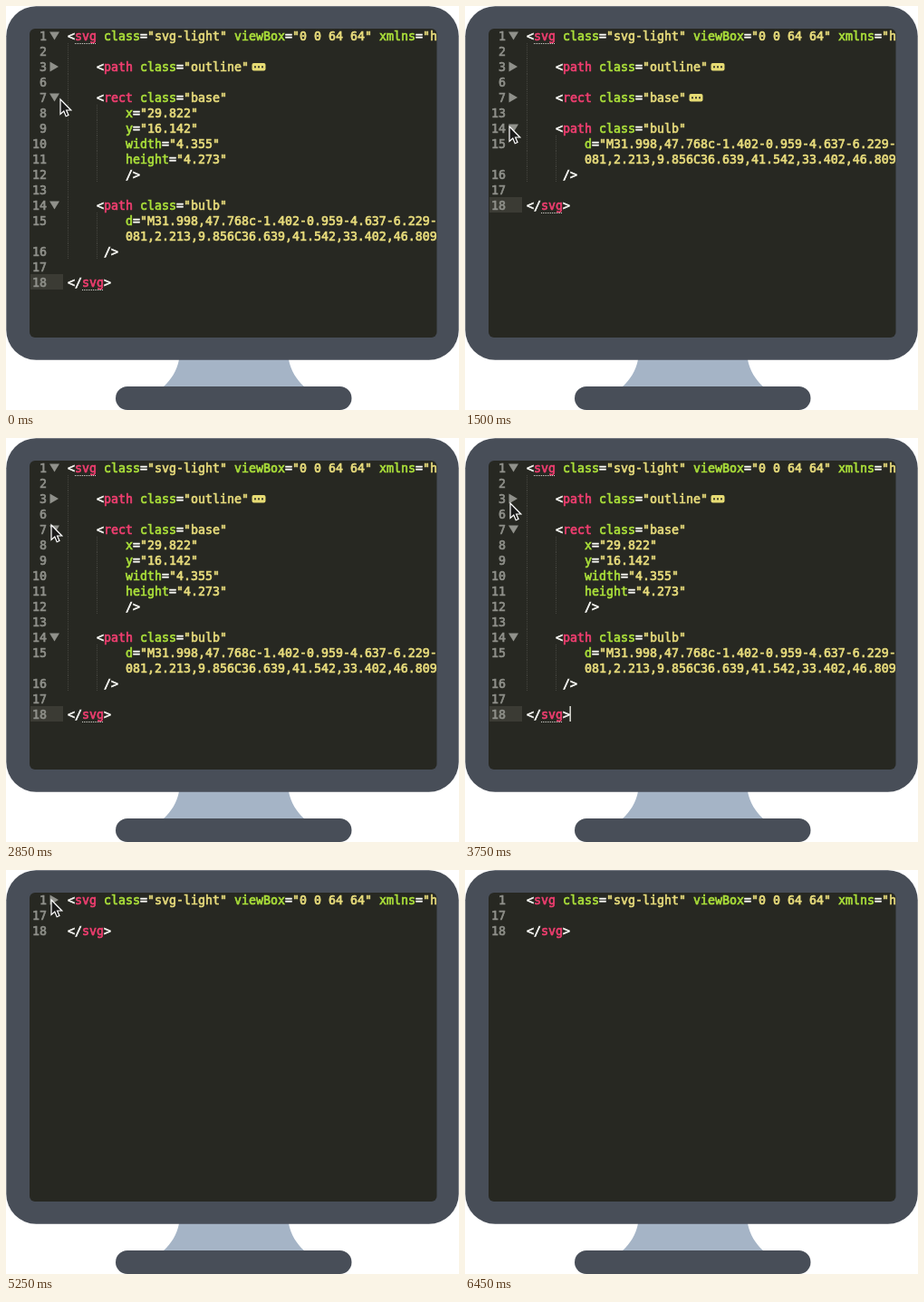
These frames come from a looping animation (500x446 px, 6600 ms). An HTML page:

```html
<!DOCTYPE html>
<html lang="en">
<head>
<meta charset="utf-8">
<title>Code folding</title>
<style>
html, body { margin: 0; width: 100%; height: 100%; overflow: hidden; background: #fff; }
svg { display: block; }
text {
  font: 13.29px "DejaVu Sans Mono", "Noto Sans Mono", monospace;
  white-space: pre;
  stroke-width: .65px;
}
.mark { fill: #fafaf6; stroke: #fafaf6; }
.tag { fill: #f03e70; stroke: #f03e70; }
.attr { fill: #abe03a; stroke: #abe03a; }
.str { fill: #e8dc7c; stroke: #e8dc7c; }
.num { fill: #8f908a; stroke: #8f908a; text-anchor: end; }
.guide { stroke: #45453f; stroke-dasharray: 1 1; }
.squiggle { stroke: #d8d8d2; stroke-dasharray: 1 1; }
.fold { fill: #90918b; }
.shell { fill: #484e58; }
</style>
</head>
<body>
<svg width="500" height="446" viewBox="0 0 500 446">
  <defs><clipPath id="screen"><rect x="26" y="25" width="449.5" height="341" rx="6"/></clipPath></defs>
  <path d="M191 390H312C314 402 321 413 329 420H174C182 413 189 402 191 390Z" fill="#a5b4c6"/>
  <rect class="shell" x=".3" y=".3" width="499.4" height="390.4" rx="33"/>
  <rect class="shell" x="121" y="420" width="260.5" height="26" rx="13"/>
  <rect x="26" y="25" width="449.5" height="341" rx="6" fill="#272822"/>
  <g clip-path="url(#screen)">
    <g id="code"></g>
    <path id="pointer" d="M0 0V16.5L3.8 13L6.2 18.7L9 17.5L6.6 12H11.8Z" fill="#1b1b1b" stroke="#fff" stroke-width="1.2"/>
  </g>
</svg>
<script>
const LOOP = 6600, STEP = 150;
const LEFT = 68, CHAR = 8, TOP = 24, ROW = 17, GUTTER = 62;

const source = `<svg class="svg-light" viewBox="0 0 64 64" xmlns="http

    <path class="outline"
        d="M38.178,12.142H25.823v10.723c-1.606,2.67
        0,8.641-8.114,8.641-17.587c0-4.881-0.854-8.
        />

    <rect class="base"
        x="29.822"
        y="16.142"
        width="4.355"
        height="4.273"
        />

    <path class="bulb"
        d="M31.998,47.768c-1.402-0.959-4.637-6.229-
        081,2.213,9.856C36.639,41.542,33.402,46.809
     />

</svg>`;

// A row starting with a digit continues the wrapped line above it.
let count = 0;
const lines = source.split('\n').map(raw => {
  const text = raw.trimStart(), wrapped = /^\d/.test(text);
  if (!wrapped) count++;
  return { n: count, indent: raw.length - text.length, text, wrapped };
});

// Blocks by first line: last line, and the time span in which they are folded.
const folds = {
  1: { last: 16, from: 5250, to: LOOP },
  3: { last: 5, from: 0, to: 4350 },
  7: { last: 12, from: 600, to: 2400 },
  14: { last: 16, from: 1650, to: 1950 }
};

// Pointer trips: leave, arrive, x, y.
const home = [60, 103];
const trips = [
  [0, 600, 51, 98],
  [750, 1350, 49, 133],
  [1950, 2250, 50, 96],
  [2850, 3750, 50, 72],
  [3750, 4050, 50, 41],
  [4050, 4200, 50, 67],
  [4800, 5250, 50, 33],
  [5700, 6450, 470, 390]
];

const within = (t, from, to) => t >= from && t < to;
const ease = k => k * k * (3 - 2 * k);
const rect = (x, y, w, h, fill, rx = 0) =>
  `<rect x="${x}" y="${y}" width="${w}" height="${h}" rx="${rx}" fill="${fill}"/>`;
const shape = (cls, d) => `<path class="${cls}" d="${d}"/>`;
const escape = s => s.replace(/</g, '&lt;').replace(/>/g, '&gt;');
const span = (cls, s) => `<tspan class="${cls}">${escape(s)}</tspan>`;

function colour({ text, wrapped }) {
  if (wrapped) return span('str', text);
  let previous = '';
  return text.replace(/"[^"]*"?|<\/?|\/?>|=|\w+|\s+/g, part => {
    const cls = part[0] === '"' ? 'str'
      : !/\w/.test(part) ? 'mark'
      : previous[0] === '<' ? 'tag' : 'attr';
    previous = part;
    return span(cls, part);
  });
}

function pointerAt(t) {
  let [x, y] = home;
  for (const [leave, arrive, toX, toY] of trips) {
    if (t < leave) break;
    const k = ease(Math.min(1, (t - leave) / (arrive - leave)));
    x += (toX - x) * k;
    y += (toY - y) * k;
  }
  return [x, y];
}

function chip(x, y) {
  let out = rect(x + .5, y + 5, 15, 8.5, '#e6db74', 2);
  for (let i = 0; i < 3; i++) out += rect(x + 3 + i * 4, y + 8.3, 2, 2, '#3a392c');
  return out;
}

function draw(t) {
  const folded = n => folds[n] && within(t, folds[n].from, folds[n].to);
  const hidden = n => Object.keys(folds).some(f => n > f && n <= folds[f].last && folded(f));
  const active = t < 4200 ? 18 : t < 4350 ? 3 : t < 5250 ? 4 : 0;
  const [px, py] = pointerAt(t);
  let out = '', row = 0;

  for (const line of lines) {
    const { n, indent, text, wrapped } = line;
    if (hidden(n)) continue;
    const y = TOP + ROW * row++, base = y + 13.6, mid = y + 9;
    const x = LEFT + indent * CHAR, end = x + text.length * CHAR;

    if (n === active) out += rect(27, y, 36, ROW, '#3b3b34');
    if (n === 3 && within(t, 4200, 5250)) {
      out += rect(LEFT, y, end - LEFT + (folded(3) ? 24 : 7), ROW, '#504e43', 2);
      out += rect(LEFT + 1, mid - 1, x - LEFT - 2, 1, '#85806d');
      out += rect(x + 5.4 * CHAR, mid - 1, 1.5, 1.5, '#9b967e');
    }
    if (within(n, 2, 17)) out += shape('guide', `M${LEFT + .5} ${y}v${ROW}`);
    if (indent > 4) out += shape('guide', `M${LEFT + 32.5} ${y}v${ROW}`);
    if (!wrapped) out += `<text class="num" x="45" y="${base}">${n}</text>`;
    if (folds[n] && px < GUTTER) {
      out += shape('fold', folded(n)
        ? `M48.5 ${mid - 5.5}l9.5 5.5l-9.5 5.5Z`
        : `M48 ${mid - 4.5}h11l-5.5 9Z`);
    }
    out += `<text x="${x}" y="${base}">${colour(line)}</text>`;
    if (folded(n)) out += chip(end + 3, y);

    const tag = text.indexOf('svg');
    if (active === 18 && tag > 0) {
      out += shape('squiggle', `M${x + tag * CHAR} ${y + 17.5}h${3 * CHAR}`);
    }
    if (n === 18 && within(t, 3600, 3900)) out += rect(end - .5, y, 1.3, ROW, '#f8f8f0');
  }

  document.getElementById('code').innerHTML = out;
  const pointer = document.getElementById('pointer');
  pointer.setAttribute('transform', `translate(${px} ${py})`);
  pointer.setAttribute('visibility', t < 6450 ? 'visible' : 'hidden');
}

const start = performance.now();
let shown = -1;
function tick() {
  const now = (performance.now() - start) % LOOP;
  const step = Math.floor(now / STEP) * STEP;
  if (step !== shown) draw(shown = step);
  requestAnimationFrame(tick);
}
tick();
</script>
</body>
</html>
```
